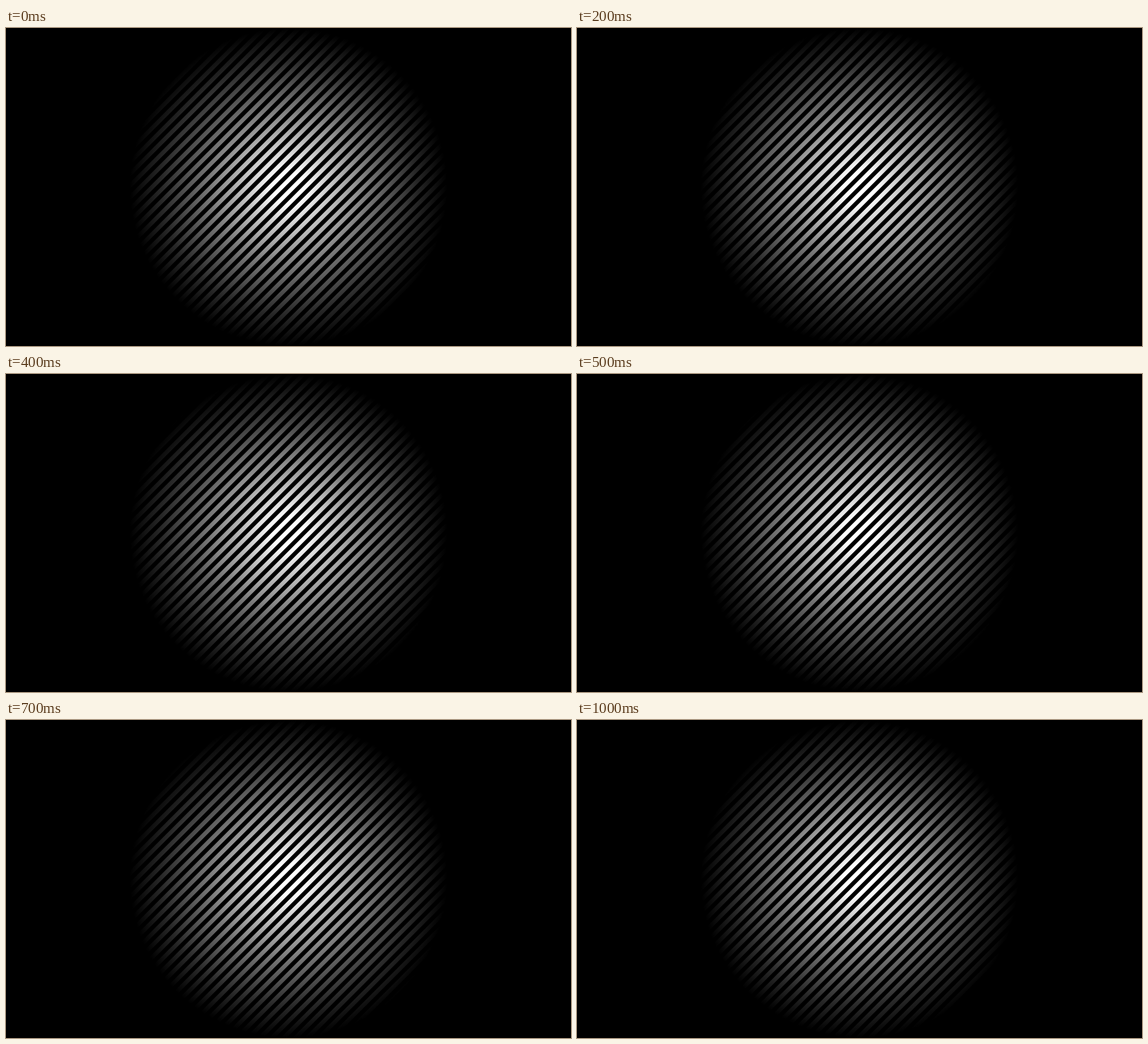
Write an HTML page with a canvas that moves like this. It is 998 px wide and 561 px high and loops after 1100 ms.

```html
<!DOCTYPE html>
<html>
<head>
<meta charset="utf-8">
<style>
  html, body { margin: 0; width: 100%; height: 100%; overflow: hidden; background: #000; }
  canvas { display: block; }
</style>
</head>
<body>
<canvas id="stage" width="998" height="561"></canvas>
<script>
const ctx = document.getElementById('stage').getContext('2d');
const W = 998, H = 561, LOOP = 1100, STEP = 100;
const PERIOD = 20.8;   // horizontal distance between stripes
const PHASE = 788.4;   // x + y along one bright stripe at time zero

const glow = ctx.createRadialGradient(W / 2, H / 2, 0, W / 2, H / 2, H / 2);
glow.addColorStop(0, '#fff');
glow.addColorStop(0.1, '#fdfdfd');
glow.addColorStop(0.5, '#787878');
glow.addColorStop(0.8, '#282828');
glow.addColorStop(1, '#000');

function draw(time) {
  const step = Math.floor((time % LOOP) / STEP);
  const shift = (PHASE + step * STEP / LOOP * PERIOD) % PERIOD;
  ctx.fillStyle = '#000';
  ctx.fillRect(0, 0, W, H);
  ctx.strokeStyle = glow;
  ctx.lineWidth = PERIOD / 2 * Math.SQRT1_2;
  ctx.beginPath();
  for (let x = shift; x < W + H + PERIOD; x += PERIOD) {
    ctx.moveTo(x + 10, -10);
    ctx.lineTo(x - H - 10, H + 10);
  }
  ctx.stroke();
}

const start = performance.now();
function tick() {
  draw(performance.now() - start);
  requestAnimationFrame(tick);
}
tick();
</script>
</body>
</html>
```
